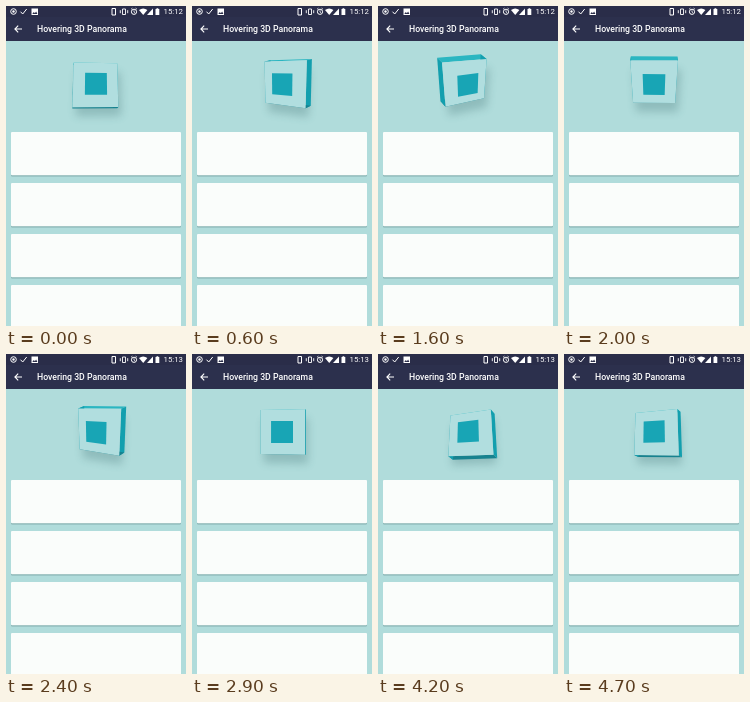
An HTML page for the animation above (4800 ms loop, 180x320 px).

```html
<!DOCTYPE html>
<html lang="en">
<head>
<meta charset="utf-8">
<title>Tilting tile</title>
<style>
html, body { margin: 0; width: 100%; height: 100%; overflow: hidden; background: #b0dcdb; }
svg { display: block; width: 180px; height: 320px; }
text { fill: #fff; font-family: Roboto, sans-serif; }
</style>
</head>
<body>
<svg viewBox="0 0 180 320">
  <defs>
    <filter id="soft" x="-50%" y="-50%" width="200%" height="200%"><feGaussianBlur stdDeviation="4.5"/></filter>
  </defs>
  <rect width="180" height="320" fill="#b0dcdb"/>
  <rect width="180" height="35" fill="#2c304d"/>
  <rect width="180" height="11" fill="#2a2d49"/>

  <!-- status icons: ring, tick, picture; phone, vibration, alarm, wifi, signal, battery -->
  <g fill="none" stroke="#fff">
    <circle cx="7.5" cy="5.5" r="2.8"/>
    <path d="M14.5 5.7l2.2 2.3 4-5"/>
    <path d="M106 2.5h3.5v6.5H106z"/>
    <path d="M116.5 3h3v5.5h-3zM114.3 4.2v3M121.7 4.2v3" stroke-width=".9"/>
    <circle cx="128" cy="5.8" r="2.6"/>
    <path d="M125 3.3l1.4-1.2M131 3.3l-1.4-1.2M128 4.3v1.7l1 .7" stroke-width=".8"/>
    <path d="M16 23H9M12.2 19.7L8.9 23l3.3 3.3" stroke-width="1.1"/>
  </g>
  <g fill="#fff">
    <circle cx="7.5" cy="5.5" r="1.2"/>
    <path d="M25.5 2.5h6.5v6.5h-6.5z"/>
    <path d="M133 4q4.2-3.2 8.4 0l-4.2 5z"/>
    <path d="M147 2.5V9h-6z"/>
    <path d="M149.5 3h1v-.8h1.8V3h1v6h-3.8z"/>
  </g>
  <path d="M26.3 8l1.5-2 1.1 1.2 1.2-1.7 1.3 2.5z" fill="#2a2d49"/>
  <text id="clock" x="177" y="8.4" font-size="7.8" text-anchor="end"></text>
  <text x="31" y="26.2" font-size="8.7" font-weight="500">Hovering 3D Panorama</text>

  <g id="cards"></g>
  <path id="shadow" fill="#28585c" opacity=".24" filter="url(#soft)"/>
  <g id="sides"></g>
  <path id="front" fill="#b1dedf"/>
  <path id="mark" fill="#18a5b5"/>
</svg>
<script>
const $ = id => document.getElementById(id);
const { sin, cos, PI } = Math;
const LOOP = 4800, STEP = 100, MINUTE_AT = 2100;
const HALF = 22.3, DEPTH = 14, VIEW = 115;
const SIDES = ["#2bb6c1", "#139fae", "#17828f", "#139fae"];

const add = (p, q, k = 1) => [p[0] + q[0] * k, p[1] + q[1] * k];
const draw = (id, points) =>
  $(id).setAttribute("d", "M" + points.map(p => p.map(v => v.toFixed(2))).join("L") + "Z");
const wave = (t, peak, period) => cos(2 * PI * (t - peak) / period);

for (let y = 126; y < 320; y += 51) {
  $("cards").innerHTML +=
    `<rect x="5" y="${y + 1}" width="170" height="43.5" rx="1" fill="#86b2b2"/>
     <rect x="5" y="${y}" width="170" height="43.3" rx="1" fill="#fafdfb"/>`;
}
$("sides").innerHTML = SIDES.map((c, i) => `<path id="side${i}" fill="${c}"/>`).join("");

function render(t) {
  // positive turn brings the right edge closer, positive pitch the top edge
  const turn = .42 * wave(t, 530, 1950);
  const pitch = .04 + .34 * wave(t, 1600, LOOP);
  const center = [90 + 5 * turn, 78 - 3 * pitch];
  const shift = [DEPTH * sin(turn), -DEPTH * sin(pitch)];

  const project = ([x, y]) => {
    const z = x * sin(turn);
    const depth = z * cos(pitch) - y * sin(pitch);
    return add(center, [x * cos(turn), y * cos(pitch) + z * sin(pitch)], VIEW / (VIEW - depth));
  };
  const square = r => [[-r, -r], [r, -r], [r, r], [-r, r]].map(project);

  const front = square(HALF);
  const back = square(HALF * .98).map(p => add(p, shift));
  draw("shadow", front.map(p => add(p, [3, 9])));
  front.forEach((p, i) => {
    const j = (i + 1) % 4;
    draw("side" + i, [p, front[j], back[j], back[i]]);
  });
  draw("front", front);
  // the mark floats above the face, so it shifts against the back
  draw("mark", square(11).map(p => add(p, shift, -.4)));
  $("clock").textContent = t < MINUTE_AT ? "15:12" : "15:13";
}

const start = performance.now();
function tick() {
  const t = (performance.now() - start) % LOOP;
  render(Math.floor(t / STEP) * STEP);
  requestAnimationFrame(tick);
}
tick();
</script>
</body>
</html>
```
